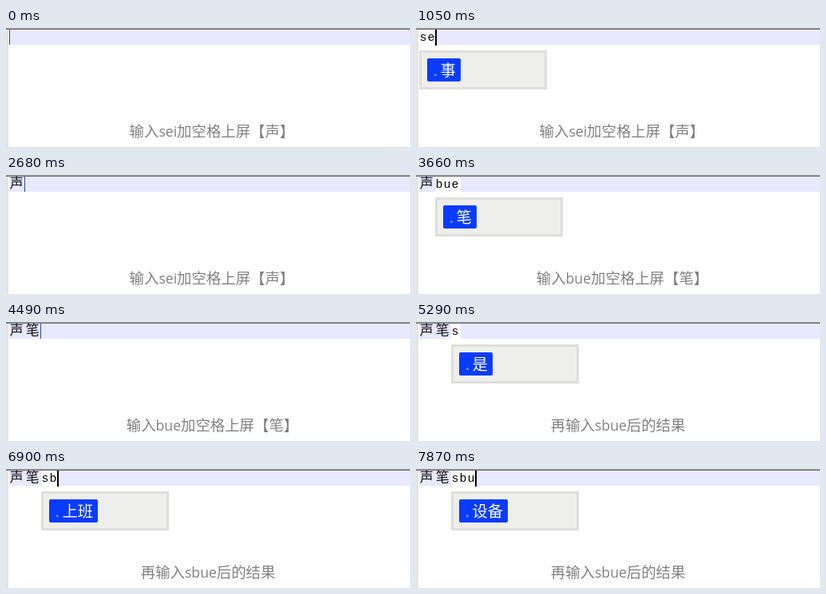
An HTML page with a canvas for the animation above (8000 ms loop, 506 px wide and 149 px high).

```html
<!DOCTYPE html>
<html lang="zh-CN">
<head>
<meta charset="utf-8">
<title>输入演示</title>
<style>
html, body { margin: 0; width: 506px; height: 149px; overflow: hidden; background: #fff; }
canvas { display: block; }
</style>
</head>
<body>
<canvas id="stage" width="506" height="149"></canvas>
<script>
const ctx = document.getElementById('stage').getContext('2d');
const LOOP = 8000;
const CJK = '"Noto Sans CJK SC", "Noto Sans CJK", sans-serif';
const LATIN = '"Open Sans", sans-serif';
const MONO = '"Liberation Mono", monospace';
const CELL = 10;

const hints = [
  { x: 154.6, before: '输入', code: 'sei', after: '加空格上屏【声】' },
  { x: 150.8, before: '输入', code: 'bue', after: '加空格上屏【笔】' },
  { x: 168.8, before: '再输入', code: 'sbue', after: '后的结果' }
];

// Each step changes only the listed parts of the state.
const steps = [
  [0, { done: '', code: '', word: '', caret: true, hint: 0 }],
  [30, { code: 's', word: '是' }],
  [510, { caret: false }],
  [620, { code: 'se', word: '事' }],
  [1050, { caret: true }],
  [1200, { code: 'sei', word: '声' }],
  [1580, { caret: false }],
  [2120, { caret: true }],
  [2170, { done: '声', code: '' }],
  [2400, { caret: false }],
  [2680, { caret: true }],
  [2730, { code: 'b', word: '不', hint: 1 }],
  [3230, { caret: false }],
  [3280, { code: 'bu', word: '便' }],
  [3660, { code: 'bue', word: '笔' }],
  [3740, { caret: true }],
  [4310, { caret: false }],
  [4490, { done: '声笔', code: '', caret: true }],
  [4730, { caret: false }],
  [4960, { caret: true }],
  [5220, { caret: false }],
  [5290, { code: 's', word: '是', hint: 2 }],
  [5780, { caret: true }],
  [6290, { caret: false }],
  [6770, { code: 'sb', word: '上班' }],
  [6830, { caret: true }],
  [7310, { caret: false }],
  [7380, { code: 'sbu', word: '设备' }],
  [7870, { caret: true }]
];

function stateAt(t) {
  const state = {};
  for (const [start, change] of steps) {
    if (start > t) break;
    Object.assign(state, change);
  }
  return state;
}

function rect(x, y, w, h, color) {
  ctx.fillStyle = color;
  ctx.fillRect(x, y, w, h);
}

function write(text, x, y, font, color) {
  ctx.font = font;
  ctx.fillStyle = color;
  ctx.fillText(text, x, y);
  return x + ctx.measureText(text).width;
}

function drawEditor() {
  rect(0, 0, 506, 149, '#fff');
  rect(0, 2, 3, 147, '#e4e4e4');
  rect(4, 2, 502, 19, '#e8e8ff');
  rect(0, 0, 506, 1, '#a0a0a0');
  rect(0, 1, 506, 1, '#696969');
}

function drawHint({ x, before, code, after }) {
  const color = '#808080';
  const font = '18.4px ' + CJK;
  x = write(before, x, 136, font, color);
  x = write(code, x, 136, '17.6px ' + LATIN, color);
  write(after, x, 136, font, color);
}

function drawPopup(x, word) {
  rect(x, 28, 160, 49, '#dededd');
  rect(x + 3, 31, 154, 43, '#eeeeec');
  ctx.fillStyle = '#0a3cff';
  ctx.beginPath();
  ctx.roundRect(x + 10, 38, 23 + 19 * word.length, 29, 2);
  ctx.fill();
  write('.', x + 18, 60, '18px ' + LATIN, '#b4ccff');
  write(word, x + 26.5, 60, '19.3px ' + CJK, '#fff');
}

function drawLine({ done, code, caret }) {
  const start = 4 + done.length * 2 * CELL;
  const end = start + code.length * CELL;
  [...done].forEach((ch, i) =>
    write(ch, 4.8 + i * 2 * CELL, 16, '300 17px ' + CJK, '#14141c'));
  if (code) {
    rect(start, 2, end - start + 2, 19, '#fff');
    [...code].forEach((ch, i) =>
      write(ch, start + 0.5 + i * CELL, 16, '15px ' + MONO, '#000'));
  }
  if (!caret) return;
  if (code) rect(end, 2, 2, 20, '#000');
  else if (done) rect(end - 1, 2, 1, 19, '#26509c');
  else rect(end, 2, 1, 19, '#8000ff');
}

function draw(now) {
  const state = stateAt(now % LOOP);
  drawEditor();
  drawHint(hints[state.hint]);
  if (state.code) drawPopup(4 + state.done.length * 2 * CELL, state.word);
  drawLine(state);
}

const begin = performance.now();
function tick() {
  draw(performance.now() - begin);
  requestAnimationFrame(tick);
}
tick();
</script>
</body>
</html>
```
